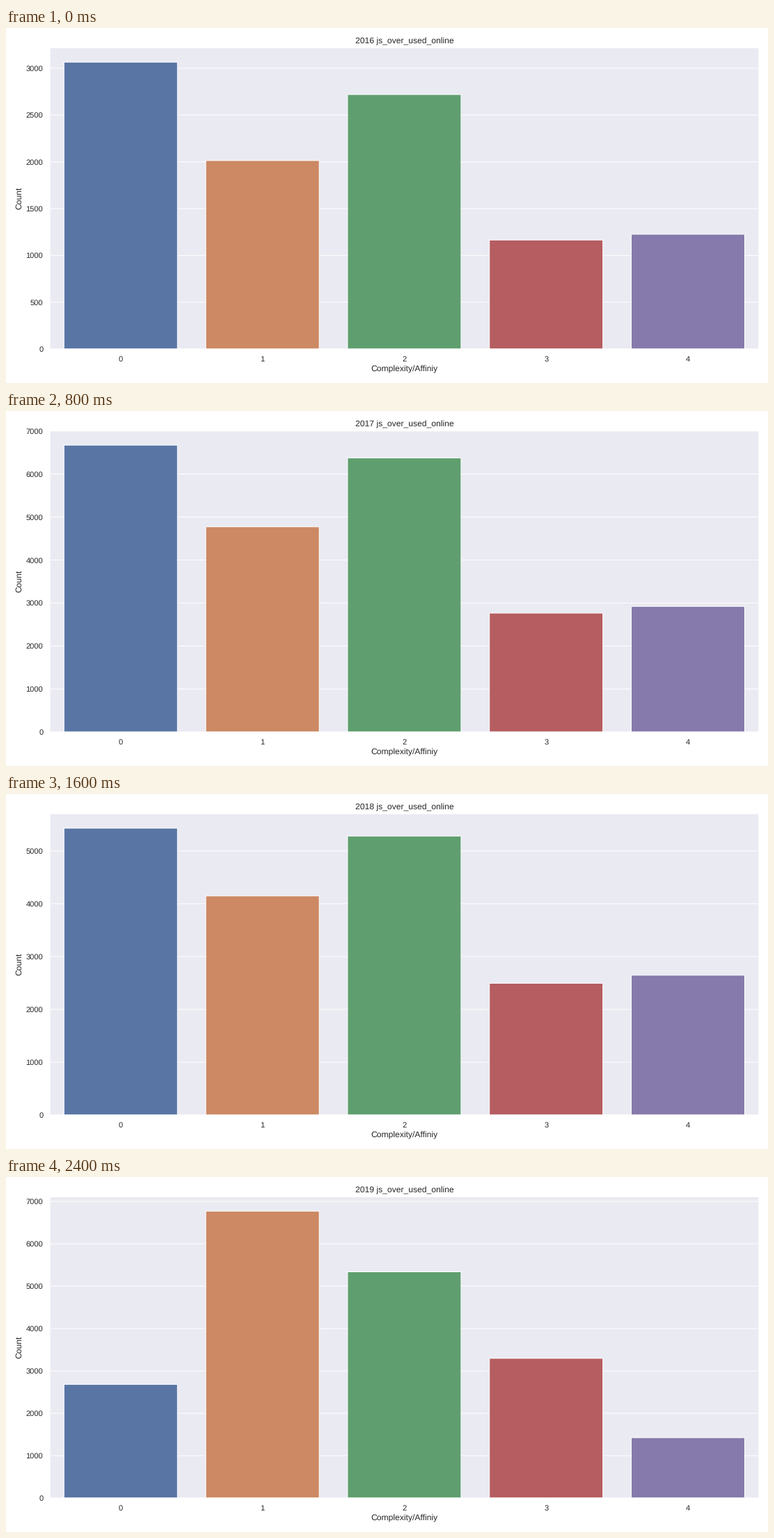
Recreate the animation shown at these times as a matplotlib script. Size 1095 px wide and 511 px high, loop 3.2 s.

```python
import matplotlib.pyplot as plt
from matplotlib.animation import FuncAnimation
from matplotlib.ticker import MultipleLocator

WIDTH, HEIGHT, DPI = 1095, 511, 73
LEFT, RIGHT, TOP, BOTTOM = 62.9, 1081.9, 28.5, 462.1

INK = "#262626"
COLORS = ["#5975a4", "#cc8963", "#5f9e6e", "#b55d60", "#857aab"]
PEAKS = [3065, 6670, 5430, 6770]


def shares(age):
    """Bar heights relative to the tallest bar, `age` years after the first."""
    if age == 3:  # the order of the bars breaks in the last year
        return [0.396, 1, 0.7885, 0.487, 0.2105]
    drift = age ** 1.2
    return [1,
            1 - 0.343 * 0.83 ** age,
            1 - 0.113 / (1 + 1.53 * age),
            0.38 + 0.0345 * drift,
            0.40 + 0.038 * drift]


plt.rcParams.update({
    "font.family": "Liberation Sans",
    "path.snap": False,
    "text.hinting": "none",
    "text.color": INK,
    "axes.labelcolor": INK,
})

fig = plt.figure(figsize=(WIDTH / DPI, HEIGHT / DPI), dpi=DPI, facecolor="white")
ax = fig.add_axes([LEFT / WIDTH, 1 - BOTTOM / HEIGHT,
                   (RIGHT - LEFT) / WIDTH, (BOTTOM - TOP) / HEIGHT])
ax.set_facecolor("#eaeaf2")
ax.set_axisbelow(True)
ax.grid(axis="y", color="white", linewidth=1)
for spine in ax.spines.values():
    spine.set(color="white", linewidth=1.25)

bars = ax.bar(range(5), [0] * 5, width=0.8, color=COLORS,
              edgecolor="white", linewidth=1)
ax.set_xlim(-0.5, 4.5)
ax.set_xticks(range(5))
ax.tick_params(left=False, bottom=False, length=6, pad=3.5,
               labelsize=11, labelcolor=INK)
ax.set_xlabel("Complexity/Affiniy", fontsize=12, labelpad=4)
ax.set_ylabel("Count", fontsize=12, labelpad=4)
title = ax.set_title("", fontsize=12, pad=6)


def draw(frame):
    peak = PEAKS[frame]
    for bar, share in zip(bars, shares(frame)):
        bar.set_height(peak * share)
    ax.set_ylim(0, peak * 1.05)
    ax.yaxis.set_major_locator(MultipleLocator(500 if peak < 4000 else 1000))
    title.set_text(f"{2016 + frame} js_over_used_online")
    return [*bars, title]


anim = FuncAnimation(fig, draw, frames=len(PEAKS), interval=800,
                     repeat=True, repeat_delay=0, blit=False)
plt.show()
```
